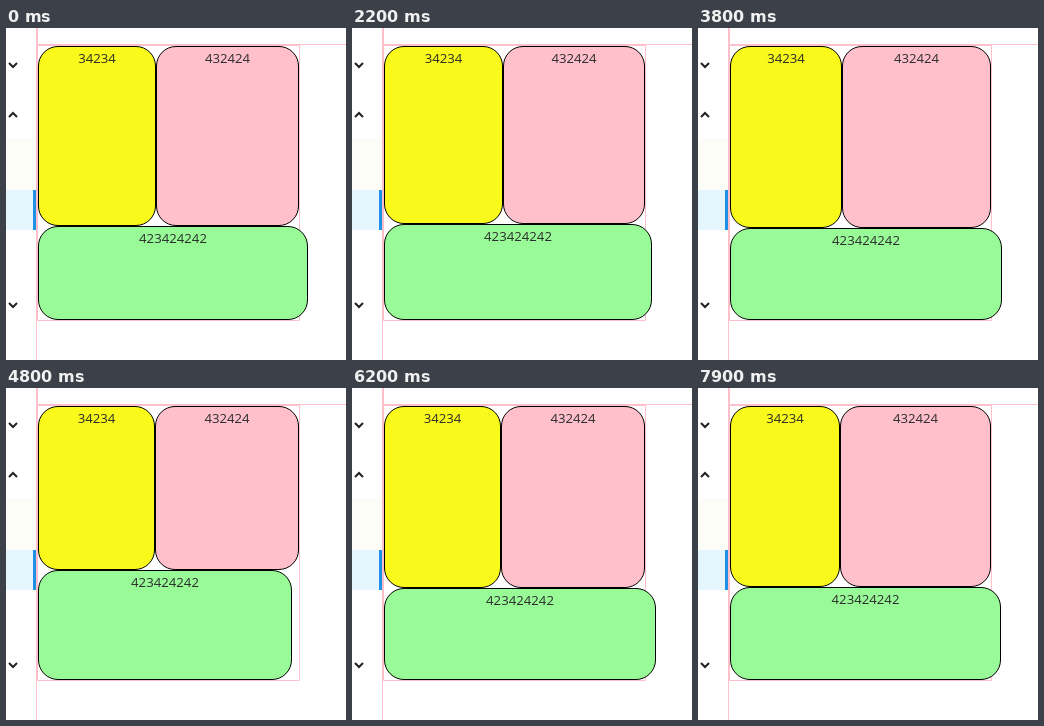
Animation, 340 px wide and 332 px high, one loop 8000 ms. Source, as an HTML page:

```html
<!DOCTYPE html>
<html lang="en">
<head>
<meta charset="utf-8">
<title>Resizable panes</title>
<style>
  html, body { margin: 0; width: 100%; height: 100%; overflow: hidden; background: #fff; }
  svg { display: block; }
  .pane { stroke: #000; }
  .line { fill: none; stroke: #ffc0cb; }
  .arrow { fill: none; stroke: #222; stroke-width: 2; }
  text { font: 13.2px "Open Sans", "Noto Sans", sans-serif; fill: #2b2b2b; text-anchor: middle; }
</style>
</head>
<body>
<svg width="340" height="332" viewBox="0 0 340 332">
  <rect y="110" width="30" height="52" fill="#fdfdf8"/>
  <rect y="162" width="30" height="40" fill="#e6f6ff"/>
  <rect x="27" y="162" width="3" height="40" fill="#2090e4"/>
  <path class="arrow" d="M3 35l4 4 4-4M3 89l4-4 4 4M3 275l4 4 4-4"/>
  <path class="line" d="M30.5 0V332M31.5 0V16M30 16.5H340M31.5 17.5H293.5V292.5H31.5Z"/>
  <g id="panes"></g>
</svg>
<script>
const NS = "http://www.w3.org/2000/svg";
const LEFT = 32, TOP = 18, RIGHT = 293, BOTTOM = 292;
const CX = 147, CY = 191;

// The divider corner circles around (CX, CY): time, x, y, completed turns
const keys = [
  [0, 150, 198, 0], [900, 144, 182, 0], [1700, 142, 201, 1],
  [2200, 151, 196, 1], [3800, 144, 200, 2], [4800, 149, 182, 2],
  [6200, 149, 200, 3], [6300, 151, 197, 3], [7900, 142, 198.6, 4]
].map(([t, x, y, turns]) => {
  let angle = Math.atan2(x - CX, y - CY);
  if (y < CY && angle < 0) angle += 2 * Math.PI;
  return { t, angle: angle + turns * 2 * Math.PI, r: Math.hypot(x - CX, y - CY) };
});

function add(parent, tag, attrs) {
  const el = document.createElementNS(NS, tag);
  for (const name in attrs) el.setAttribute(name, attrs[name]);
  return parent.appendChild(el);
}

function makePane(fill, label) {
  const group = document.getElementById("panes");
  const rect = add(group, "rect", { class: "pane", rx: 19.5, fill });
  const text = add(group, "text", {});
  text.textContent = label;
  return (x1, y1, x2, y2) => {
    rect.setAttribute("x", x1 + 0.5);
    rect.setAttribute("y", y1 + 0.5);
    rect.setAttribute("width", x2 - x1 - 1);
    rect.setAttribute("height", y2 - y1 - 1);
    text.setAttribute("x", (x1 + x2) / 2);
    text.setAttribute("y", y1 + 17);
  };
}

const yellow = makePane("#f9f91b", "34234");
const pink = makePane("#ffc0cb", "432424");
const green = makePane("#98fb98", "423424242");

function corner(t) {
  const i = Math.max(1, keys.findIndex(k => k.t >= t));
  const a = keys[i - 1], b = keys[i];
  const f = (t - a.t) / (b.t - a.t);
  const angle = a.angle + (b.angle - a.angle) * f;
  const r = a.r + (b.r - a.r) * f;
  return [Math.round(CX + r * Math.sin(angle)), Math.round(CY + r * Math.cos(angle))];
}

function draw(now) {
  const [x, y] = corner(Math.floor(now % 8000 / 100) * 100);
  yellow(LEFT, TOP, x, y);
  pink(x, TOP, RIGHT, y);
  green(LEFT, y, y + 104, BOTTOM);
}

let start;
function tick(now) {
  start ??= now;
  draw(now - start);
  requestAnimationFrame(tick);
}
draw(0);
requestAnimationFrame(tick);
</script>
</body>
</html>
```
